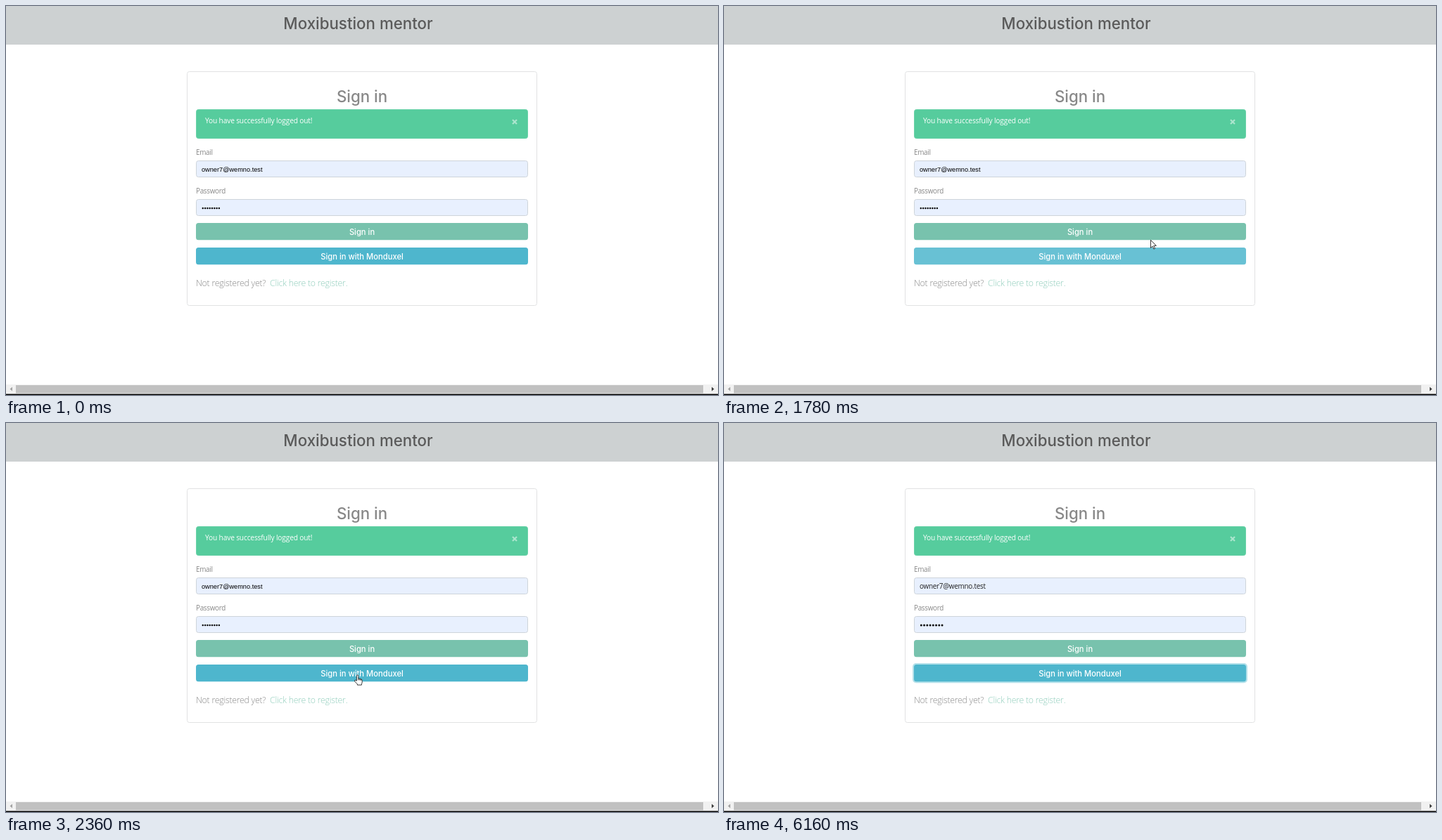
Write an HTML page that moves like this. It is 1012 by 554 pixels and loops after 8 s.

```html
<!DOCTYPE html>
<html lang="en">
<head>
<meta charset="utf-8">
<title>Sign in</title>
<style>
  html, body { margin: 0; width: 100%; height: 100%; overflow: hidden; background: #fff; }
  svg { display: block; width: 1012px; height: 554px; }
  text { font-family: "Open Sans", "Noto Sans", sans-serif; }
  .head { font: 500 22.3px Inter, sans-serif; text-anchor: middle; }
  .btn { font: 500 11.2px Inter, sans-serif; text-anchor: middle; fill: #fff; }
  .label { font-size: 9.9px; letter-spacing: -.03em; fill: #888; }
  .note { font-size: 10.2px; letter-spacing: -.016em; fill: #fff; }
  .foot { font-size: 12.3px; font-weight: 300; letter-spacing: -.02em; }
  .field { fill: #e8f0fe; stroke: #ced4da; }
  .preview { font: 9.2px "Liberation Sans", Arial, sans-serif; fill: #000; }
  .filled { font-size: 9.9px; letter-spacing: -.025em; fill: #222; }
  .dots { stroke: #111; stroke-linecap: round; }
  .cursor { fill: #fff; stroke: #222; stroke-width: .9; stroke-linejoin: round; }
</style>
</head>
<body>
<svg viewBox="0 0 1012 554">
  <rect width="1012" height="55" fill="#cdd1d2"/>
  <text class="head" x="500.5" y="32.5" fill="#5a5a5a">Moxibustion mentor</text>

  <rect x="257.5" y="93.5" width="497" height="333" rx="3" fill="#fff" stroke="#e1e2e3"/>
  <text class="head" x="506" y="136.5" fill="#888">Sign in</text>

  <rect x="270.5" y="147.5" width="471" height="41" rx="3" fill="#56cc9d" stroke="#6bd2a9"/>
  <text class="note" x="283" y="167">You have successfully logged out!</text>
  <path d="M720 162l6 6m0-6l-6 6" stroke="#abe5ce" stroke-width="2.3"/>

  <text class="label" x="270" y="211.5">Email</text>
  <rect class="field" x="270.5" y="220.5" width="471" height="23" rx="3"/>
  <text class="label" x="270" y="266.5">Password</text>
  <rect class="field" x="270.5" y="275.5" width="471" height="23" rx="3"/>

  <g id="preview">
    <text class="preview" x="278" y="236">owner7@wemno.test</text>
    <path class="dots" d="M279.8 288h23.2" stroke-width="2.5" stroke-dasharray="0 3.3"/>
  </g>
  <g id="filled">
    <text class="filled" x="278" y="236">owner7@wemno.test</text>
    <path class="dots" d="M280.3 288h29.9" stroke-width="3" stroke-dasharray="0 4.25"/>
  </g>

  <rect id="signIn" x="270" y="309" width="472" height="24.3" rx="3.5"/>
  <text class="btn" x="506" y="325.5">Sign in</text>
  <rect id="ring" rx="5" fill="#b5e1ea"/>
  <rect id="social" x="270" y="344" width="472" height="24.3" rx="3.5"/>
  <text class="btn" x="506" y="360.5">Sign in with Monduxel</text>

  <text class="foot" x="270" y="398.5" fill="#888">Not registered yet?</text>
  <text class="foot" x="375" y="398.5" fill="#8fcdbb">Click here to register.</text>

  <rect y="539" width="1012" height="13" fill="#f1f1f1"/>
  <rect x="14" y="540" width="977" height="11.5" fill="#c1c1c1"/>
  <path d="M9 542.5v6l-3.5-3z" fill="#a3a3a3"/>
  <path d="M1003 542.5v6l3.5-3z" fill="#404040"/>
  <rect y="552.5" width="1012" height="1.5" fill="#000"/>

  <path id="arrow" class="cursor" d="M0 0V11.2l2.6-2.4 1.8 4 1.7-.8-1.8-3.9h3.6z"/>
  <path id="hand" class="cursor" d="M-1.2 8.4V1.3a1.2 1.2 0 0 1 2.4 0V5.2l4 .8q1.4.4 1.4 2V10q0 1.5-.8 3v1.3h-6v-1.2L-3.9 9.2q-.7-1.4.4-1.8 1-.2 2 1zM1.2 5.2v2.4M3.2 5.8v2M5 6.2v1.8"/>
</svg>
<script>
const LOOP = 8000;

// Each table row: start time, then the value held until the next row.
const pointer = [
  [0, null],
  [1720, "arrow", 641.7, 337.3],
  [1780, "arrow", 606.5, 333.3],
  [1850, "hand", 575, 328],
  [1940, "hand", 547, 328],
  [2030, "arrow", 523, 335],
  [2120, "hand", 507.6, 346.4],
  [2190, "hand", 501.5, 356],
  [2210, "hand", 499.6, 358.2],
  [2360, "hand", 499.6, 358.8],
  [6160, null]
];
const green = [
  [0, "#78c2ad"], [1850, "#70bea8"], [1940, "#5eb69d"],
  [2120, "#6dbca5"], [2190, "#76c1ac"], [2210, "#78c2ad"]
];
const blue = [
  [0, "#4eb6cd"], [1780, "#68c1d4"], [1850, "#6cc3d5"],
  [2190, "#56b9cf"], [2210, "#4eb6cd"]
];
const glow = [[0, 0], [3880, .6], [3980, 1.5], [4080, 2]];
const FILL_TIME = 3880;

const el = id => document.getElementById(id);
const at = (table, t) => table.findLast(row => row[0] <= t);
const show = (id, on) => el(id).setAttribute("visibility", on ? "visible" : "hidden");

function set(id, attrs) {
  for (const key in attrs) el(id).setAttribute(key, attrs[key]);
}

function draw(t) {
  const [, kind, x, y] = at(pointer, t);
  for (const id of ["arrow", "hand"]) {
    show(id, id === kind);
    if (id === kind) set(id, { transform: `translate(${x} ${y})` });
  }
  set("signIn", { fill: at(green, t)[1] });
  set("social", { fill: at(blue, t)[1] });

  const g = at(glow, t)[1];
  set("ring", { x: 270 - g, y: 344 - g, width: 472 + 2 * g, height: 24.3 + 2 * g });
  show("ring", g > 0);

  show("preview", t < FILL_TIME);
  show("filled", t >= FILL_TIME);
}

const start = performance.now();
function tick() {
  draw((performance.now() - start) % LOOP);
  requestAnimationFrame(tick);
}
tick();
</script>
</body>
</html>
```
